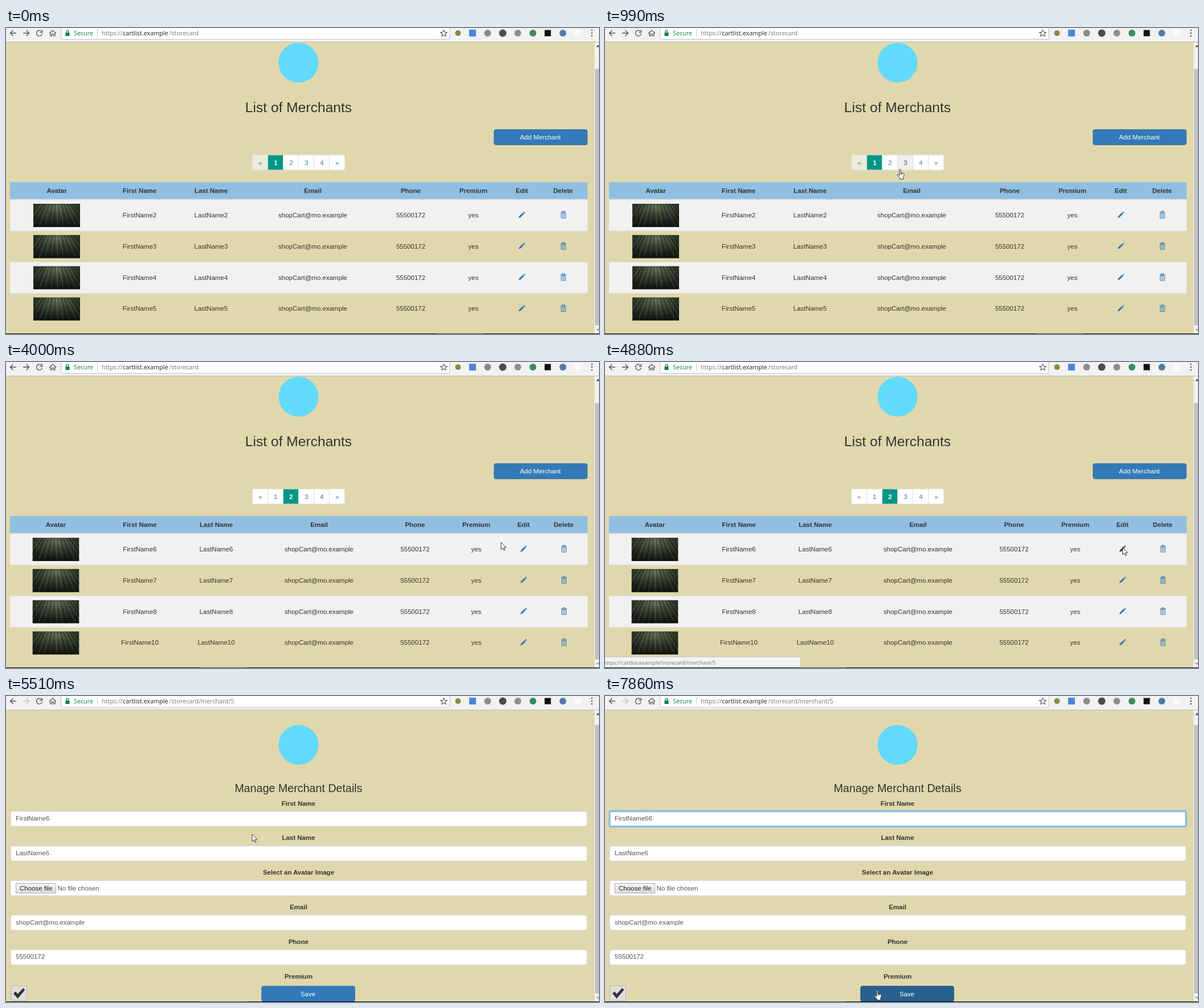
An HTML page that plays this animation: 1041 px wide and 538 px high, repeating every 8000 ms.

```html
<!DOCTYPE html>
<html lang="en">
<head>
<meta charset="utf-8">
<title>Merchants</title>
<style>
  html, body { margin: 0; width: 100%; height: 100%; overflow: hidden; background: #e0d8ac; }
  svg { display: block; width: 100vw; height: 100vh; }
  text { font: 11.5px "Liberation Sans", Arial, sans-serif; text-anchor: middle; fill: #333; white-space: pre; }
  .left { text-anchor: start; }
  .bold { font-weight: bold; }
  .url { font-family: "Open Sans", "Noto Sans", sans-serif; font-size: 10.8px; text-anchor: start; fill: #777; }
  .small { font-size: 9.24px; }
  .title { font-size: 24.6px; }
  .subtitle { font-size: 19.66px; }
  .field { fill: #555; text-anchor: start; }
</style>
</head>
<body>
<svg viewBox="0 0 1041 538" preserveAspectRatio="none">
  <defs>
    <radialGradient id="light" cx=".5" cy=".15" r=".7">
      <stop offset="0" stop-color="#626d57"/>
      <stop offset=".4" stop-color="#3b4534"/>
      <stop offset="1" stop-color="#171d17"/>
    </radialGradient>
    <linearGradient id="button" x2="0" y2="1">
      <stop stop-color="#f6f6f6"/><stop offset="1" stop-color="#dcdcdc"/>
    </linearGradient>
    <clipPath id="frame"><rect width="82" height="41"/></clipPath>
    <g id="photo" clip-path="url(#frame)"></g>
    <g id="pencil">
      <path d="M-5.6 5.6L-4.6 2.4 1.9-3.9 4.2-1.6-2.4 4.7ZM2.7-4.7L3.6-5.5Q4.3-5.9 5.2-4.9T5.7-3.2L5-2.4Z"/>
    </g>
    <g id="trash" fill="none" stroke="#337ab7">
      <path d="M-5-4H5M-1.8-4.4V-5.9H1.8V-4.4" stroke-width="1.1"/>
      <path d="M-3.9-2.3H3.9V6H-3.9ZM-1.3-1.5V5M1.3-1.5V5" stroke-width="1"/>
    </g>
    <path id="arrow" d="M0 0V12.5L2.9 9.9 5 14.4 7 13.5 5 9.2H9Z" fill="#fff" stroke="#222" stroke-width=".9"/>
    <path id="hand" transform="scale(1.14)" d="M-1 1.2C-1-.1 1-.1 1 1.2V5.8L5 6.7Q6.6 7.2 6.2 9L5.2 13V15.6H-.3V14L-4 10C-5 8.8-3.6 7.9-2.6 8.8L-1 10ZM1 6V8.5M3 6.5V8.6" fill="#fff" stroke="#222" stroke-width=".8"/>
    <path id="beam" d="M-3-8Q0-8 0-6.5Q0-8 3-8M0-7V7M-3 8Q0 8 0 6.5Q0 8 3 8" fill="none" stroke="#222"/>
  </defs>
  <g id="stage"></g>
</svg>
<script>
const LOOP = 8000;
const PITCH = 54.8, FIELD_PITCH = 60.85;
const BLUE = '#337ab7';
const EMAIL = 'shopCart@mo.example', PHONE = '55500172';
const HOST = 'cartlist.example', LIST_PATH = '/storecard', EDIT_PATH = '/storecard/merchant/5';

const text = (x, y, s, cls = '', attrs = '') => `<text x="${x}" y="${y}" class="${cls}" ${attrs}>${s}</text>`;
const rect = (x, y, w, h, fill, attrs = '') => `<rect x="${x}" y="${y}" width="${w}" height="${h}" fill="${fill}" ${attrs}/>`;
const circle = (x, y, r, fill, attrs = '') => `<circle cx="${x}" cy="${y}" r="${r}" fill="${fill}" ${attrs}/>`;
const line = (d, color, width = 1) => `<path d="${d}" fill="none" stroke="${color}" stroke-width="${width}"/>`;
const use = (id, x, y, attrs = '') => `<use href="#${id}" transform="translate(${x} ${y})" ${attrs}/>`;
const repeat = (n, fn) => Array.from({ length: n }, (_, i) => fn(i)).join('');
const inside = (p, x, y, w, h) => p && p.x >= x && p.x < x + w && p.y >= y && p.y < y + h;

document.getElementById('photo').innerHTML = rect(0, 0, 82, 41, 'url(#light)') + repeat(23, i => {
  const d = i - 11;
  return line(`M${41 + d * 2.6} 0L${41 + d * 5.5 + i % 3} 41`, i % 2 ? '#a3b08e38' : '#0c120e70', .7 + i % 3 * .4);
}) + rect(0, 36, 82, 5, '#0c110d', 'opacity=".5"');

// Pointer trips: start, end, number of steps, then [step, x, y] knots.
const trips = [
  [190, 990, 11, [[0, 900, 512], [2, 788, 398], [6, 600, 285], [10, 518, 248]]],
  [1070, 1300, 4, [[0, 502, 240], [3, 502, 238]]],
  [3010, 3230, 4, [[0, 505, 238], [3, 516, 239]]],
  [3460, 3690, 4, [[0, 524, 243], [3, 569.5, 268]]],
  [3840, 4150, 6, [[0, 640, 280], [2, 869, 317], [5, 937, 327]]],
  [4320, 4710, 6, [[0, 932, 325], [5, 908.5, 326]]],
  [5200, 5980, 11, [[0, 870, 320], [4, 432, 243], [10, 150, 225]]],
  [7310, 7860, 8, [[0, 165, 240], [4, 370, 430], [7, 478, 517]]],
];

function pointerAt(t) {
  const trip = trips.filter(([start]) => t >= start).pop();
  if (!trip) return null;
  const [start, end, steps, knots] = trip;
  const k = Math.min(steps - 1, Math.floor((t - start) / (end - start) * (steps - 1) + .15));
  const i = Math.max(1, knots.findIndex(([step]) => step >= k));
  const [k0, x0, y0] = knots[i - 1], [k1, x1, y1] = knots[i];
  const f = (k - k0) / (k1 - k0);
  return { x: x0 + (x1 - x0) * f, y: y0 + (y1 - y0) * f };
}

function browser(editing) {
  const dark = '#505050';
  return rect(0, 0, 1041, 24, '#f2f2f2') + rect(0, 24, 1041, 1, '#b9b9b9')
    + rect(97, -4, 682, 24, '#fff', 'stroke="#bdbdbd" rx="2"')
    + line('M18 9H8M12.5 4L7.5 9 12.5 14', dark, 1.4)
    + line('M30 9H40M35.5 4L40.5 9 35.5 14', editing ? '#c4c4c4' : dark, 1.4)
    + line('M62 5.5A5 5 0 1 0 63.5 10M63.5 3.5V7.5H59.5', dark, 1.4)
    + line('M76 9.5L82 4 88 9.5M78 8.5V14H80.5V10.5H83.5V14H86V8.5', dark, 1.2)
    + rect(104.5, 8, 7, 6, '#0b8043') + line('M106 8V6.5Q106 4.5 108 4.5T110 6.5V8', '#0b8043', 1.3)
    + text(119, 13, 'Secure', 'url', 'style="fill:#0b8043"') + rect(160, 2, 1, 14, '#d0d0d0')
    + text(168, 13, 'https://', 'url') + text(205, 13, HOST, 'url', 'style="fill:#222"')
    + text(286.5, 13, editing ? EDIT_PATH : LIST_PATH, 'url')
    + line('M768.5 3.5L770.2 7.3 774.3 7.6 771.1 10.3 772.2 14.3 768.5 12.1 764.8 14.3 765.9 10.3 762.7 7.6 766.8 7.3Z', dark, 1.1)
    + circle(793.5, 9, 5, '#8a8a3d') + rect(813, 3, 12, 12, '#4b86dc') + circle(845.5, 9, 6, '#8b8b8b')
    + circle(872, 9, 6.5, '#4b4b4b') + circle(898.5, 9, 6, '#8e8e8e') + circle(925, 9, 6, '#3c8a5b')
    + rect(945.5, 3.5, 11, 11, '#111') + circle(977.5, 9, 6, '#4f7ba8') + rect(997.5, 3, 12, 12, '#fafafa')
    + [4, 9, 14].map(y => circle(1028.5, y, 1.3, dark)).join('');
}

function chrome(editing, page) {
  const top = editing ? 51 : 72;
  return rect(1033, 25, 8, 512, '#f1f1f1') + rect(1034, top, 7, 523 - top, '#c1c1c1')
    + '<path d="M1036 33.5H1041V31L1039 30Z" fill="#505050"/><path d="M1036 529H1041V531L1039 532.5Z" fill="#a3a3a3"/>'
    + rect(0, 537, 1041, 1, '#050505') + rect(page === 1 ? 757 : 341, 537, 82, 1, '#444');
}

function primaryButton(x, y, label, hover) {
  return rect(x + .8, y + .5, 163.6, 27, hover ? '#286090' : BLUE, `rx="3.3" stroke="${hover ? '#204d74' : '#2e6da4'}" stroke-width=".8"`)
    + text(x + 82, y + 18, label, '', 'style="fill:#fff"');
}

function pagination(page, pointer) {
  return ['«', '1', '2', '3', '4', '»'].map((label, i) => {
    const x = 433 + i * 27, active = i === page, disabled = i === 0 && page === 1;
    const hover = !active && inside(pointer, x, 223, 27, 27);
    const fill = active ? '#009688' : disabled ? '#ebeddc' : hover ? '#eee' : '#fff';
    const color = active ? '#fff' : i === 0 ? '#777' : hover ? '#23527c' : BLUE;
    return rect(x - .3, 223.2, 27, 26.5, fill, `stroke="#ddd" stroke-width=".8" rx="${i % 5 ? 0 : 2.5}"`)
      + text(x + 13.5, 241, label, active ? 'bold' : '', `style="fill:${color}"`);
  }).join('');
}

function list(page, pointer) {
  const columns = page === 1
    ? [89, 234.5, 360, 538.5, 710.5, 820.5, 905.5, 978.5]
    : [87.5, 235, 369, 549.5, 718, 825.5, 908.5, 979.5];
  const heads = ['Avatar', 'First Name', 'Last Name', 'Email', 'Phone', 'Premium', 'Edit', 'Delete'];
  const numbers = page === 1 ? [2, 3, 4, 5] : [6, 7, 8, 10];
  const rows = numbers.map((n, row) => {
    const y = 302 + row * PITCH;
    const striped = row % 2 === 0, hover = inside(pointer, 7, y, 1014, PITCH);
    const fill = striped ? '#f1f1f1' : hover ? '#f5f5f5' : 'none';
    const cells = ['FirstName' + n, 'LastName' + n, EMAIL, PHONE, 'yes'];
    const onPencil = inside(pointer, columns[6] - 7, y + 19, 14, 14);
    return rect(7, y, 1014, PITCH, fill) + rect(7, y - .4, 1014, .8, '#ddd')
      + use('photo', columns[0] - 41, y + 7)
      + cells.map((s, i) => text(columns[i + 1], y + 31, s)).join('')
      + use('pencil', columns[6], y + 26.3, `fill="${onPencil ? '#23405e' : BLUE}"`)
      + use('trash', columns[7], y + 26.3);
  }).join('');
  return circle(513.5, 61, 35, '#61dafb') + text(513.5, 148, 'List of Merchants', 'title')
    + primaryButton(856, 178, 'Add Merchant') + pagination(page, pointer)
    + rect(7, 271, 1014, 30, '#91bfe2') + rows + rect(7, 300.6, 1014, 1.6, '#ddd')
    + heads.map((s, i) => text(columns[i] - (i === 7 ? .5 : 0), 290, s, 'bold')).join('');
}

function form(pointer, t) {
  const focus = Math.max(0, Math.min(1, (t - 6230) / 220));
  const typed = t >= 7080;
  const labels = ['First Name', 'Last Name', 'Select an Avatar Image', 'Email', 'Phone', 'Premium'];
  const values = ['FirstName6' + (typed ? '6' : ''), 'LastName6', '', EMAIL, PHONE];
  const caret = t >= 6300 && t < 6900 || typed && t < 7610;
  const glow = [[5, .25], [3, .25], [1.3, 1]].map(([width, strength]) =>
    rect(8, 202.5, 1012, 27, 'none', `rx="3.3" stroke="#66afe9" stroke-width="${width}" opacity="${strength * focus}"`)).join('');
  return circle(513.5, 86, 35, '#61dafb') + text(513.5, 168.5, 'Manage Merchant Details', 'subtitle')
    + labels.map((s, i) => text(513.5, 192.5 + i * FIELD_PITCH, s, 'bold')).join('')
    + values.map((s, i) => rect(8, 202.5 + i * FIELD_PITCH, 1012, 27, '#fff', 'rx="3.3" stroke="#ccc"')
      + text(17, 219 + i * FIELD_PITCH, s, 'field')).join('')
    + (t >= 6300 ? glow : '') + (caret ? rect(typed ? 83.2 : 76.6, 209, .9, 13, '#222') : '')
    + rect(17.5, 329.5, 70, 17, 'url(#button)', 'stroke="#adadad"')
    + text(24, 342, 'Choose file', 'left', 'style="fill:#222"') + text(90.5, 342, 'No file chosen', 'field')
    + rect(9.5, 509.5, 27, 26, '#dedede', 'stroke="#b8b8b8"')
    + '<path d="M13 523L17 519.5 20.5 524 30 513.5 33.5 516.5 20.5 532Z" fill="#333"/>'
    + primaryButton(448, 509.5, 'Save', inside(pointer, 448, 510, 165, 27));
}

function statusBar() {
  return rect(-2, 518.5, 345, 19, '#f2f2f2', 'stroke="#c4c4c4" rx="2"')
    + text(-3, 531.5, 'https://' + HOST + EDIT_PATH, 'url small');
}

function pointerShape(p, editing, t) {
  if (editing) {
    if (inside(p, 448, 510, 165, 27)) return 'hand';
    const overField = [0, 1, 3, 4].some(i => inside(p, 8, 202 + i * FIELD_PITCH, 1012, 28));
    return overField ? 'beam' : 'arrow';
  }
  const link = inside(p, 433, 223, 162, 27) || inside(p, 901, 321, 14, 14) && t < 4880;
  return link ? 'hand' : 'arrow';
}

function scene(t) {
  const pointer = pointerAt(t);
  const editing = t >= 4950, page = t < 2620 ? 1 : 2;
  const pressed = t >= 2540 && t < 2690 || t >= 6300 && t < 6450;
  return rect(0, 0, 1041, 538, '#e0d8ac')
    + (editing ? form(pointer, t) : list(page, pointer))
    + browser(editing)
    + (t >= 4640 && t < 5270 ? statusBar() : '')
    + chrome(editing, page)
    + (pressed ? circle(pointer.x, pointer.y - .5, 10, '#f2ec3c', 'opacity=".75"') : '')
    + (pointer ? use(pointerShape(pointer, editing, t), pointer.x, pointer.y) : '');
}

const stage = document.getElementById('stage');
let shown = '';
function draw(now) {
  const markup = scene(now % LOOP);
  if (markup !== shown) stage.innerHTML = shown = markup;
  requestAnimationFrame(draw);
}
draw(performance.now());
</script>
</body>
</html>
```
